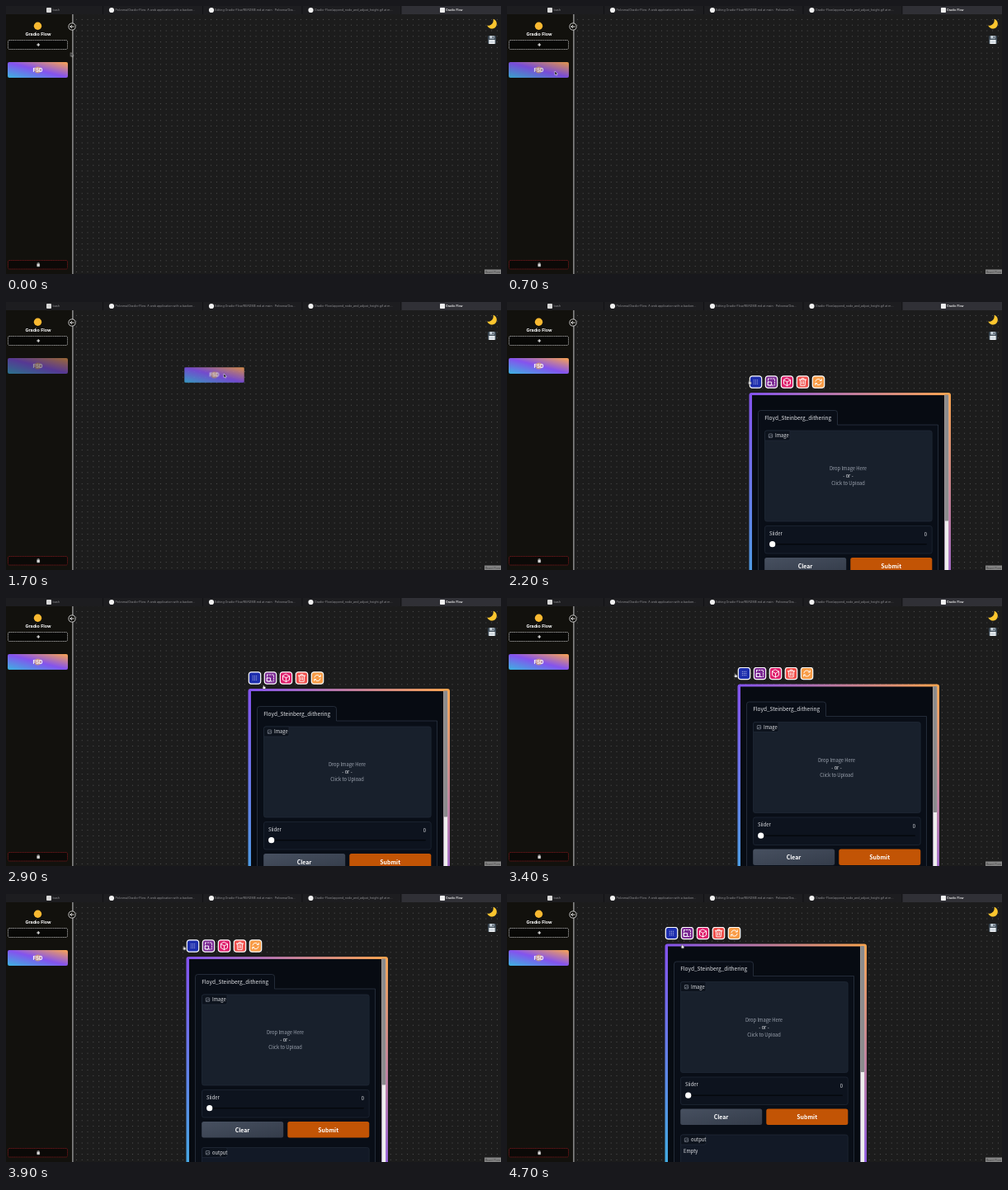
An HTML page that plays this animation: 600x325 px, repeating every 4.8 s.

```html
<!DOCTYPE html>
<html lang="en">
<head>
<meta charset="utf-8">
<title>Gradio Flow</title>
<style>
html, body { margin: 0; width: 100%; height: 100%; overflow: hidden; background: #1c1c1c; }
svg { display: block; width: 600px; height: 325px; }
text { font-family: Inter, "Open Sans", sans-serif; fill: #fff; }
.mid { text-anchor: middle; }
.tabs text { font-size: 3.6px; fill: #8f8f92; }
.tabs .on { fill: #ececec; font-weight: 600; }
.app text { font-family: "Noto Sans CJK JP", "Noto Sans CJK SC", "Noto Sans CJK", "Noto Sans", sans-serif; font-size: 5.75px; fill: #e5e7eb; }
.app .hint { fill: #9ca3af; }
.app .tab { font-size: 6.5px; }
.app .act { font-size: 6.9px; font-weight: 700; fill: #fff; }
.tools rect.box { stroke: #fff; stroke-width: 1.2; }
.line { fill: none; stroke: #fff; stroke-width: .9; stroke-linecap: round; stroke-linejoin: round; }

/* Every segment advances in 100 ms steps of the 4800 ms loop. */
.node, .cursor, .pulse, .ghost, .arrow, .hand { animation: 4.8s infinite step-end; }
.node { animation-name: drag; }
.cursor { animation-name: point; }
.pulse { animation-name: pulse; }
.ghost { animation-name: carry; }
.arrow { animation-name: arrow; }
.hand { animation-name: hand; }

@keyframes point {
  0% { transform: translate(78.5px, 56.5px); }
  4.166% { transform: translate(78px, 58px); animation-timing-function: steps(5); }
  14.583% { transform: translate(58px, 79px); animation-timing-function: steps(6); }
  27.083% { transform: translate(50px, 76px); animation-timing-function: steps(1); }
  29.166% { transform: translate(76px, 76px); animation-timing-function: steps(1); }
  31.25% { transform: translate(142px, 78px); animation-timing-function: steps(2); }
  35.416% { transform: translate(264px, 87px); animation-timing-function: steps(1); }
  37.5% { transform: translate(290px, 93px); animation-timing-function: steps(1); }
  39.583% { transform: translate(302px, 96px); animation-timing-function: steps(3); }
  45.833% { transform: translate(293.5px, 95.5px); animation-timing-function: steps(3); }
  52.083% { transform: translate(297px, 98px); animation-timing-function: steps(4); }
  60.416% { transform: translate(312px, 106px); animation-timing-function: steps(3); }
  66.666% { transform: translate(290.5px, 97.5px); animation-timing-function: steps(2); }
  70.833% { transform: translate(276.5px, 92px); animation-timing-function: steps(2); }
  75% { transform: translate(252px, 81px); animation-timing-function: steps(3); }
  81.25% { transform: translate(215.5px, 63.5px); animation-timing-function: steps(3); }
  87.5% { transform: translate(190px, 49px); animation-timing-function: steps(1); }
  89.583% { transform: translate(188.5px, 48px); animation-timing-function: steps(4); }
  97.916%, 100% { transform: translate(212px, 61.5px); }
}
@keyframes drag {
  0% { visibility: hidden; transform: none; }
  41.666% { visibility: visible; transform: translate(0, 0); }
  66.666% { visibility: visible; transform: translate(0, 0); animation-timing-function: steps(2); }
  70.833% { visibility: visible; transform: translate(-14px, -5.5px); animation-timing-function: steps(2); }
  75% { visibility: visible; transform: translate(-38.5px, -16.5px); animation-timing-function: steps(3); }
  81.25% { visibility: visible; transform: translate(-75px, -34px); animation-timing-function: steps(3); }
  87.5% { visibility: visible; transform: translate(-100.5px, -48.5px); }
  89.583%, 100% { visibility: visible; transform: translate(-102px, -49.5px); }
}
@keyframes pulse {
  0% { opacity: 1; }
  8.333% { opacity: 1; animation-timing-function: steps(3); }
  14.583% { opacity: .9; animation-timing-function: steps(4); }
  22.916% { opacity: .6; animation-timing-function: steps(3); }
  29.166% { opacity: .5; animation-timing-function: steps(3); }
  35.416% { opacity: .6; animation-timing-function: steps(3); }
  41.666%, 100% { opacity: 1; }
}
@keyframes carry { 0%, 41.666%, 100% { opacity: 0; } 29.166% { opacity: .85; } }
@keyframes arrow { 0% { opacity: 1; } 41.666%, 100% { opacity: 0; } }
@keyframes hand { 0% { opacity: 0; } 41.666%, 100% { opacity: 1; } }
</style>
</head>
<body>
<svg viewBox="0 0 600 325">
  <defs>
    <pattern id="dots" x="82" y="13" width="6.8" height="6.8" patternUnits="userSpaceOnUse">
      <circle cx="3.4" cy="3.4" r=".5" fill="#686868"/>
    </pattern>
    <linearGradient id="glow" x1="0" y1="1" x2="1" y2="0">
      <stop offset="0" stop-color="#3bb4e0"/>
      <stop offset=".5" stop-color="#8453ee"/>
      <stop offset="1" stop-color="#fba54e"/>
    </linearGradient>
    <linearGradient id="grey" x1="0" y1="0" x2="1" y2="1">
      <stop offset="0" stop-color="#475060"/>
      <stop offset="1" stop-color="#343c4a"/>
    </linearGradient>
    <g id="fsd">
      <rect width="73" height="19" rx="2" fill="url(#glow)"/>
      <circle cx="36.5" cy="9.5" r="4" fill="#f3b93f" opacity=".55"/>
      <text class="mid" x="36.5" y="11.8" font-size="6.2" font-weight="700">FSD</text>
    </g>
    <g id="pic" fill="none" stroke="#9ca3af" stroke-width=".6">
      <rect x="-2.2" y="-2.2" width="4.4" height="4.4" rx=".6"/>
      <path d="M-2 1.8 .6 -.4 2.2 1"/>
    </g>
  </defs>

  <!-- canvas -->
  <rect width="600" height="325" fill="#1c1c1c"/>
  <rect x="82" y="10" width="518" height="315" fill="url(#dots)"/>

  <!-- node -->
  <g class="node">
    <g class="tools">
      <g transform="translate(301.5 97)">
        <rect class="box" x="-7.2" y="-7.2" width="14.4" height="14.4" rx="3" fill="#1e2fae"/>
        <path class="line" stroke-dasharray="0 2.2" d="M-2.2 -2.2H2.3M-2.2 0H2.3M-2.2 2.2H2.3"/>
      </g>
      <g transform="translate(320.5 97)">
        <rect class="box" x="-7.2" y="-7.2" width="14.4" height="14.4" rx="3" fill="#7b2a93"/>
        <rect class="line" x="-4" y="-4" width="8" height="8" stroke-dasharray="1.4 1.6"/>
        <rect class="line" x="-4" y="0" width="4" height="4"/>
      </g>
      <g transform="translate(339.5 97)">
        <rect class="box" x="-7.2" y="-7.2" width="14.4" height="14.4" rx="3" fill="#de1f6c"/>
        <path class="line" d="M0 -4.6 4 -2.4V2.3L0 4.6-4 2.3V-2.4ZM-4 -2.4 0 -.1 4 -2.4M0 -.1V4.6"/>
      </g>
      <g transform="translate(358.5 97)">
        <rect class="box" x="-7.2" y="-7.2" width="14.4" height="14.4" rx="3" fill="#f0504c"/>
        <path class="line" d="M-4.2 -2.8H4.2M-1.4 -2.8V-4.4H1.4V-2.8M-3.2 -2.8-2.7 4.4H2.7L3.2 -2.8M-1 -.8V2.4M1 -.8V2.4"/>
      </g>
      <g transform="translate(377.5 97)">
        <rect class="box" x="-7.2" y="-7.2" width="14.4" height="14.4" rx="3" fill="#f89b45"/>
        <path class="line" d="M-3.6 -.8A3.7 3.7 0 0 1 3.2 -1.8M3.6 .8A3.7 3.7 0 0 1 -3.2 1.8M3.8 -3.6V-1.5H1.7M-3.8 3.6V1.5H-1.7"/>
      </g>
    </g>

    <g class="app">
      <rect x="293.5" y="110" width="244.5" height="290" rx="3" fill="url(#glow)"/>
      <rect x="297" y="113" width="233.5" height="284" fill="#070b12"/>
      <rect x="530.5" y="113" width="4.7" height="284" fill="#eee"/>
      <rect x="530.5" y="112.5" width="4.7" height="153" rx="1" fill="#8b8b8d"/>

      <path d="M304.5 397V134.5a3 3 0 0 1 3-3H397.5a3 3 0 0 1 3 3V149H522.5V397" fill="#090e17" stroke="#2b3442" stroke-width=".8"/>
      <text class="tab" x="312.2" y="142.7">Floyd_Steinberg_dithering</text>

      <g stroke="#212a38" stroke-width=".7">
        <rect x="312.5" y="156" width="202.7" height="110" rx="2.5" fill="#18202c"/>
        <path d="M312.5 168V158.5a2.5 2.5 0 0 1 2.5 -2.5H343V166a2 2 0 0 1 -2 2Z" fill="#0d131d"/>
        <rect x="312.5" y="271.5" width="202.7" height="33.5" rx="2.5" fill="#0d131e"/>
        <rect x="312.5" y="341.5" width="202.7" height="60" rx="2.5" fill="#121926"/>
        <path d="M312.5 353.5V344a2.5 2.5 0 0 1 2.5 -2.5H343V351.500a2 2 0 0 1 -2 2Z" fill="#0d131d"/>
      </g>
      <use href="#pic" x="319.5" y="162.2"/>
      <text x="325" y="164.2" font-size="5.6">Image</text>
      <g class="mid">
        <text class="hint" x="413.5" y="204.2">Drop Image Here</text>
        <text x="413.5" y="213.3">- or -</text>
        <text class="hint" x="413.5" y="222.4">Click to Upload</text>
      </g>

      <text x="318" y="282.8">Slider</text>
      <text class="mid" x="507.3" y="284">0</text>
      <rect x="318" y="293" width="191" height="1.6" rx=".8" fill="#05080d"/>
      <circle cx="321.7" cy="293.7" r="3.6" fill="#fff"/>

      <rect x="312.2" y="310" width="99" height="19.500" rx="2.5" fill="url(#grey)"/>
      <rect x="416.300" y="310" width="99" height="19.500" rx="2.5" fill="#c25405"/>
      <text class="act mid" x="361.5" y="322.6">Clear</text>
      <text class="act mid" x="465.700" y="322.6">Submit</text>

      <use href="#pic" x="319.5" y="347.7"/>
      <text x="325" y="349.700">output</text>
      <text x="316" y="363.800">Empty</text>
    </g>
  </g>

  <!-- theme and save -->
  <path d="M590.5 15.800A6 6 0 1 1 583.2 23.600A6.300 6.300 0 0 0 590.5 15.800Z" fill="#fbc52e"/>
  <g transform="translate(584 36)">
    <rect width="10" height="10" rx="1" fill="#3d4a55"/>
    <rect x="2.2" width="5.6" height="3.6" fill="#c3ced6"/>
    <rect x="5.6" y=".6" width="1.3" height="2.4" fill="#3d4a55"/>
    <rect x="1.4" y="5" width="7.2" height="5" fill="#f2f5f7"/>
    <path d="M2.4 6.7H7.600M2.4 8.300H7.600" stroke="#8fa3b2" stroke-width=".5"/>
  </g>
  <rect x="580" y="319.5" width="20" height="5.5" fill="#858585"/>
  <text class="mid" x="590" y="323.6" font-size="3.500" style="fill:#444">React Flow</text>

  <!-- sidebar -->
  <rect y="10" width="81" height="315" fill="#12110d"/>
  <rect x="80.4" y="10" width="1" height="315" fill="#c9c9c9"/>
  <circle cx="80" cy="25" r="4.1" fill="#12110d" stroke="#e4e4e4" stroke-width=".8"/>
  <path class="line" stroke-width=".7" d="M82 25H78M79.5 23.500 78 25 79.5 26.500"/>
  <circle cx="38.5" cy="24.300" r="4.700" fill="#f9b931"/>
  <text class="mid" x="39" y="35.800" font-size="5.4" font-weight="700">Gradio Flow</text>
  <rect x="2.5" y="41.500" width="72" height="11" rx="1.500" fill="#080806" stroke="#a9a9a9" stroke-width=".8" stroke-dasharray="1.6 .6"/>
  <path d="M37.300 47H41.100M39.200 45.100V48.900" stroke="#fff"/>
  <g class="pulse"><use href="#fsd" x="2" y="68"/></g>
  <rect x="2.5" y="308.500" width="72" height="10.500" rx="1.500" fill="#0b0907" stroke="#74191b" stroke-width=".8" stroke-dasharray="1.6 .5"/>
  <path d="M37.400 312.200H41M38.500 311.600H39.900M37.800 313V315.800H40.600V313Z" fill="#ddd" stroke="#ddd" stroke-width=".6"/>

  <!-- browser tabs -->
  <g class="tabs">
    <rect width="600" height="10" fill="#1d1d20"/>
    <rect x="479" width="121" height="10" fill="#303036"/>
    <path d="M117.500 0V10M238.500 0V10M359 0V10M479 0V10" stroke="#0e0e10" stroke-width=".7"/>
    <rect x="49" y="2" width="6" height="6" rx="1" fill="#d8d8d8"/>
    <text x="56.500" y="6.400">bash</text>
    <g fill="#f0f0f0">
      <circle cx="128" cy="5" r="3.100"/>
      <circle cx="249" cy="5" r="3.100"/>
      <circle cx="369.500" cy="5" r="3.100"/>
      <rect x="526" y="2" width="6" height="6" rx=".8"/>
    </g>
    <text x="132.500" y="6.400">Pelvoma/Gradio-Flow: A web application with a backen…</text>
    <text x="253" y="6.400">Editing Gradio-Flow/README.md at main · Pelvoma/Gra…</text>
    <text x="374" y="6.400">Gradio-Flow/append_node_and_adjust_height.gif at m…</text>
    <text class="on" x="533" y="6.400">Gradio Flow</text>
  </g>

  <!-- pointer with the carried button -->
  <g class="cursor">
    <g class="ghost"><use href="#fsd" x="-48" y="-8"/></g>
    <path class="arrow" d="M0 0V4.600L1.100 3.700 1.900 5.300 2.700 4.900 1.900 3.400H3.300Z" fill="#000" stroke="#fff" stroke-width=".5"/>
    <path class="hand" d="M-.4 0Q.3 -.5 .8 .2V1.200L2.600 1.700Q3 2.800 2.300 4.300H-.2L-1.600 2.300 -.4 2.400Z" fill="#fff" stroke="#222" stroke-width=".4"/>
  </g>
</svg>
</body>
</html>
```
